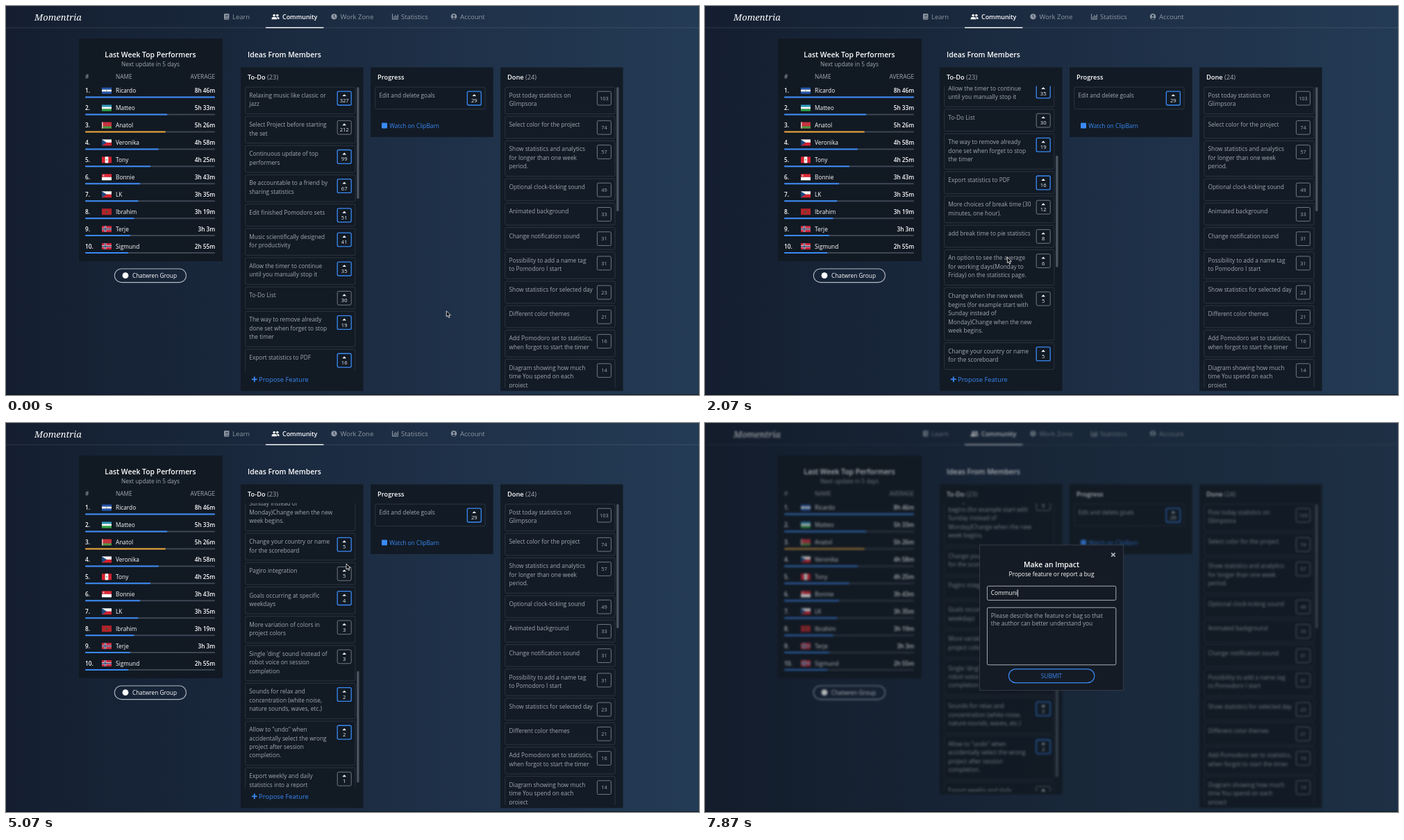
An HTML page for the animation above (8 s loop, 998 by 561 pixels).

```html
<!DOCTYPE html>
<html lang="en">
<head>
<meta charset="utf-8">
<title>Community board</title>
<style>
html, body { margin: 0; width: 100%; height: 100%; overflow: hidden; background: #141e30; }
svg { display: block; width: 100vw; height: 100vh; }
text { font-family: "Open Sans", "Noto Sans", sans-serif; font-size: 8.32px; fill: #fff; white-space: pre; }
.h { font-size: 10.4px; font-weight: 600; }
.h2 { font-size: 9.25px; font-weight: 600; }
.sub { fill: #a3a9b1; }
.nav { font-size: 9.45px; fill: #8f98a4; }
.on { font-size: 8.95px; font-weight: 600; fill: #fff; }
.row { font-weight: 500; }
.time { font-weight: 600; }
.num { font-size: 7.6px; font-weight: 500; fill: #eef0f2; }
.count { font-size: 7.4px; fill: #a3a9b1; }
.blue { fill: #3a8af5; }
.link { font-size: 9.4px; fill: #3a8af5; }
.logo { font-family: "Noto Serif", "Liberation Serif", serif; font-style: italic; font-size: 13px; }
.mid { text-anchor: middle; }
.end { text-anchor: end; }
.panel { fill: #111820; fill-opacity: .86; }
</style>
</head>
<body>
<svg id="stage" viewBox="0 0 998 561" preserveAspectRatio="none"></svg>
<script>
const BLUE = '#3a8af5', GREY = '#8f98a4';
const text = (x, y, s, cls = '') => `<text x="${x}" y="${y}" class="${cls}">${s}</text>`;
const rect = (x, y, w, h, fill, more = '') =>
  `<rect x="${x}" y="${y}" width="${w}" height="${h}" fill="${fill}" ${more}/>`;
const box = (x, y, w, h, stroke, sw, rx) =>
  rect(x, y, w, h, 'none', `stroke="${stroke}" stroke-width="${sw}" rx="${rx}"`);
const path = (d, fill, more = '') => `<path d="${d}" fill="${fill}" ${more}/>`;
const circle = (x, y, r, fill, more = '') => `<circle cx="${x}" cy="${y}" r="${r}" fill="${fill}" ${more}/>`;
const panel = (x, y, w, h, id = '') =>
  `<rect ${id && `id="${id}"`} class="panel" x="${x}" y="${y}" width="${w}" height="${h}"/>`;

// Ideas: votes, "*" when voted by the viewer, lines split by "|"
const parse = list => list.trim().split('\n').map(s => {
  const [, votes, star, body] = s.trim().match(/^(\d+)(\*?) (.*)$/);
  return { votes, voted: !!star, lines: body.split('|') };
});
const todo = parse(`
327* Relaxing music like classic or|jazz
212 Select Project before starting|the set
99* Continuous update of top|performers
67* Be accountable to a friend by|sharing statistics
51* Edit finished Pomodoro sets
41* Music scientifically designed|for productivity
35* Allow the timer to continue|until you manually stop it
30 To-Do List
19* The way to remove already|done set when forget to stop|the timer
16* Export statistics to PDF
12 More choices of break time (30|minutes, one hour).
8 add break time to pie statistics
6 An option to see the average|for working days(Monday to|Friday) on the statistics page.
5 Change when the new week|begins (for example start with|Sunday instead of|Monday)Change when the new|week begins.
5* Change your country or name|for the scoreboard
5 Pagiro integration
5 A possibility to pause and|resume work session
4* Goals occurring at specific|weekdays
3 More variation of colors in|project colors
3 Single 'ding' sound instead of|robot voice on session|completion
2* Sounds for relax and|concentration (white noise,|nature sounds, waves, etc.)
2* Allow to "undo" when|accidentally select the wrong|project after session|completion.
1 Export weekly and daily|statistics into a report`);
const done = parse(`
103 Post today statistics on|Glimpsora
74 Select color for the project
57 Show statistics and analytics|for longer than one week|period.
49 Optional clock-ticking sound
33 Animated background
31 Change notification sound
31 Possibility to add a name tag|to Pomodoro I start
23 Show statistics for selected day
21 Different color themes
16 Add Pomodoro set to statistics,|when forgot to start the timer
14 Diagram showing how much|time You spend on each|project`);

// After the vote the idea climbs above the ones with five votes
const voted = todo.slice();
const [raised] = voted.splice(16, 1);
voted.splice(13, 0, { ...raised, votes: '6', voted: true });

function cards(list, x, arrows = true) {
  let y = 117, out = '';
  for (const { votes, voted, lines } of list) {
    const step = lines.length > 1 ? lines.length * 12.475 + 17.2 : 35.25;
    out += box(x, y, 158.3, step - 3.6, '#36404c', .7, 2);
    lines.forEach((s, i) => out += text(x + 5.7, y + 15 + i * 12.475, s, 'sub'));
    const bx = x + 132.6, cx = bx + 10;
    out += box(bx, y + 6.2, 20, 19.8, voted ? BLUE : '#7c848e', voted ? 1.3 : .9, 2);
    out += arrows
      ? path(`M${cx - 2.8} ${y + 13.1}l2.8-2.9 2.8 2.9z`, '#fff') + text(cx, y + 22.1, votes, 'num mid')
      : text(cx, y + 18.8, votes, 'count mid');
    y += step;
  }
  return out;
}

// Flags, drawn on a 14 by 9 field
const bands = (...c) => c.map((f, i) => rect(0, i * 9 / c.length, 14, 9 / c.length + .05, f)).join('');
const czech = bands('#f4f4f4', '#d3222f') + path('M0 0L7 4.5 0 9z', '#1d4a80');
const norway = rect(0, 0, 14, 9, '#c8283c') + path('M5 0V9M0 4.5H14', 'none', 'stroke="#fff" stroke-width="2.4"') +
  path('M5 0V9M0 4.5H14', 'none', 'stroke="#1c3668" stroke-width="1.2"');
const flags = {
  sv: bands('#2456b0', '#fff', '#2456b0') + circle(7, 4.5, .9, '#8aa67a'),
  uz: bands('#2f9fc4', '#fff', '#2fa548'),
  by: rect(0, 0, 14, 9, '#c8313e') + rect(0, 6, 14, 3, '#4a9a42') + rect(0, 0, 1.6, 9, '#e4b9b9'),
  cz: czech,
  pe: rect(0, 0, 14, 9, '#d2212f') + rect(4.7, 0, 4.6, 9, '#fff') + circle(7, 4.5, 1.1, '#9aa580'),
  sg: bands('#dd2a38', '#fff') + circle(3.2, 2.3, 1.5, '#fff') + circle(3.9, 2.3, 1.3, '#dd2a38'),
  ma: rect(0, 0, 14, 9, '#b3232b') + path('M7 2.8L8.1 6.1 5.3 4.1H8.7L5.9 6.1z', 'none', 'stroke="#27603a" stroke-width=".5"'),
  no: norway
};
const people = [
  ['sv', 'Ricardo', 526], ['uz', 'Matteo', 333], ['by', 'Anatol', 326], ['cz', 'Veronika', 298], ['pe', 'Tony', 265],
  ['sg', 'Bonnie', 223], ['cz', 'LK', 215], ['ma', 'Ibrahim', 199], ['no', 'Terje', 183], ['no', 'Sigmund', 175]
];
function leaderboard() {
  let out = panel(105, 47, 207, 321) +
    text(208, 73.7, 'Last Week Top Performers', 'h mid') +
    text(208, 87.3, 'Next update in 5 days', 'sub mid') +
    text(114, 105, '#', 'sub') + text(158, 105, 'NAME', 'sub') + text(301, 105, 'AVERAGE', 'sub end');
  people.forEach(([flag, name, min], i) => {
    const y = 122 + i * 24.94;
    out += text(114, y + 3.1, `${i + 1}.`, 'time') +
      `<g transform="translate(138 ${y - 4.4})">${flags[flag]}</g>` +
      text(158, y + 3.1, name, 'row') +
      text(301.3, y + 3.1, `${min / 60 | 0}h ${min % 60}m`, 'time end') +
      rect(114, y + 8.6, 187, 2, '#3d4653', 'rx="1"') +
      rect(114, y + 8.6, 187 * min / people[0][2], 2, i == 2 ? '#eda435' : BLUE, 'rx="1"');
  });
  return out + box(156.3, 379, 103.2, 19.6, '#b4bac2', 1.1, 9.8) +
    circle(172, 388.7, 4.4, '#fff') + text(182, 391.8, 'Chatwren Group', 'row');
}

function header() {
  const head = (x, c) => circle(x, 13.6, 1.8, c);
  return rect(0, 30.8, 998, .8, '#fff', 'opacity=".14"') +
    text(41, 20.5, 'Momentria', 'logo') +
    rect(314, 11, 7.4, 8.8, GREY, 'rx="1.2"') + path('M316 13.3H320M316 15H320M315.5 18H321.4', 'none', 'stroke="#18263a" stroke-width=".7"') +
    text(326, 18.8, 'Learn', 'nav') +
    head(386.2, '#fff') + head(390.8, '#fff') +
    path('M382.6 19.2v-1.2a2 2 0 0 1 2-2h3.4a2 2 0 0 1 2 2v1.2zM390.6 18.8h3v-1a1.7 1.7 0 0 0-1.7-1.7h-1.6q.6.9.3 2.7z', '#fff') +
    text(398, 18.8, 'Community', 'nav on') + rect(374, 30.6, 83.4, 1.4, '#fff') +
    circle(472.5, 15.3, 4.1, GREY) + path('M472.5 12.6V15.6L474.4 17', 'none', 'stroke="#1a2a40" stroke-width=".9"') +
    text(481.5, 18.8, 'Work Zone', 'nav') +
    path('M556.5 11.3V18.9H565M558.8 17.5V15M560.7 17.5V13M562.6 17.5V14.4M564.4 17.5V12', 'none', `stroke="${GREY}" stroke-width="1.1"`) +
    text(569, 18.8, 'Statistics', 'nav') +
    circle(645, 15.3, 4.2, GREY) + circle(645, 13.9, 1.5, '#1d2f46') + path('M642.4 17.9q2.6-3 5.2 0-2.6 2-5.2 0z', '#1d2f46') +
    text(654, 18.8, 'Account', 'nav');
}

function board() {
  const title = (x, name, n) => text(x, 106.2, name +
    (n ? ` <tspan font-weight="400" fill="#a3a9b1">(${n})</tspan>` : ''), 'h2');
  return text(348, 73.7, 'Ideas From Members', 'h') +
    panel(338, 88.5, 176.6, 466.7, 'todoPanel') + panel(525, 88.5, 176.6, 100.5) + panel(712, 88.5, 176.6, 466.7) +
    title(348, 'To-Do', 23) + title(535, 'Progress') + title(722, 'Done', 24) +
    `<g clip-path="url(#todoClip)"><g id="list"><g id="before">${cards(todo, 344.6)}</g><g id="after">${cards(voted, 344.6)}</g></g></g>` +
    rect(505.2, 0, 3.3, 161, '#4b5560', 'rx="1.6" id="thumb"') +
    `<g id="propose">${path('M357.8 534.5V542.3M353.9 538.4H361.7', 'none', `stroke="${BLUE}" stroke-width="1.8"`)}` +
    text(364, 541.8, 'Propose Feature', 'link') + '</g>' +
    cards(parse('29* Edit and delete goals'), 531.7) +
    rect(541, 168.6, 8, 8, BLUE, 'rx="1"') + text(552.3, 175.6, 'Watch on ClipBarn', 'blue row') +
    `<g clip-path="url(#doneClip)">${cards(done, 718.8, false)}</g>` +
    rect(879.2, 117, 3.3, 179, '#4b5560', 'rx="1.6"');
}

const modal = () =>
  rect(395.5, 176, 207, 209.5, '#141b25', 'stroke="#3a434f" stroke-width=".8"') +
  path('M585.2 187.3L590.6 192.7M590.6 187.3L585.2 192.7', 'none', 'stroke="#adb3ba" stroke-width="1.7"') +
  text(499, 207.7, 'Make an Impact', 'h mid') +
  text(499, 221.2, 'Propose feature or report a bug', 'mid') +
  box(406.4, 235.2, 185.4, 20.4, '#b9bec4', .9, 2) +
  '<text id="typed" x="411.8" y="248.1"></text>' + rect(0, 240.2, .8, 10, '#fff', 'id="caret"') +
  box(406.4, 266.2, 185.4, 82.6, '#b9bec4', .9, 2) +
  text(411.8, 280.6, 'Please describe the feature or bag so that', 'sub') +
  text(411.8, 292.1, 'the author can better understand you', 'sub') +
  box(437.4, 354.9, 123.5, 19.7, BLUE, 1.2, 9.8) + text(499, 367.8, 'SUBMIT', 'blue mid');

document.getElementById('stage').innerHTML = `<defs>
  <linearGradient id="sky"><stop offset="0" stop-color="#141e30"/><stop offset="1" stop-color="#243b55"/></linearGradient>
  <clipPath id="todoClip">${rect(340, 115.5, 165, 410.5, '#000', 'id="listArea"')}</clipPath>
  <clipPath id="doneClip">${rect(714, 115.5, 165, 435, '#000')}</clipPath></defs>` +
  rect(0, 0, 998, 561, 'url(#sky)') +
  `<g id="page">${header()}${leaderboard()}${board()}</g>` +
  rect(0, 0, 998, 561, '#141c27', 'id="shade"') + `<g id="modal">${modal()}</g>` +
  rect(0, 560.2, 998, .8, '#0b1118') +
  `<g id="cursor">${path('M0 0V8.2L1.9 6.5 3.3 9.6 4.7 9 3.4 6H6z', '#000', 'stroke="#fff" stroke-width=".8"')}</g>`;

const el = {};
for (const id of ['page', 'shade', 'modal', 'list', 'listArea', 'before', 'after', 'thumb', 'todoPanel', 'propose', 'typed', 'caret', 'cursor'])
  el[id] = document.getElementById(id);

const clamp = p => Math.max(0, Math.min(1, p));
const smooth = p => p * p * (3 - 2 * p);
const glide = p => smooth(1 - (1 - p) ** 1.5);

// Keys are [time, ...values]; values ease from one key to the next
function track(keys, t, ease) {
  let i = 0;
  while (i < keys.length - 2 && t >= keys[i + 1][0]) i++;
  const [a, b] = [keys[i], keys[i + 1]];
  const p = ease(clamp((t - a[0]) / (b[0] - a[0])));
  return a.slice(1).map((v, k) => v + (b[k + 1] - v) * p);
}
const END = 641.4;
const scrollKeys = [[450, 0], [870, 36], [1040, 36], [1070, 39], [1870, 252], [2050, 252], [2070, 256.2],
  [2730, 490], [2850, 490], [2870, 496.4], [3200, END], [4800, END], [5600, 604.2]];
const cursorKeys = [[60, 634.3, 439.8], [330, 435.3, 362.3], [3500, 435.3, 362.3], [3730, 436, 366],
  [4040, 436, 366], [4070, 436.5, 367], [4300, 436.5, 367], [4470, 490, 203], [5640, 490, 203],
  [5930, 461.7, 299.7], [6000, 460, 306], [6470, 395, 536]];
const keyTimes = [7070, 7200, 7290, 7400, 7530, 7730, 7870];
const word = 'Communi', DURATION = 8000;
const show = (node, on) => node.setAttribute('display', on ? 'inline' : 'none');

function draw(t) {
  const [scroll] = track(scrollKeys, t, glide);
  el.list.setAttribute('transform', `translate(0 ${-scroll})`);
  el.thumb.setAttribute('y', 117 + scroll * 247 / END);
  show(el.before, t < 4800);
  show(el.after, t >= 4800);

  const open = smooth(clamp((t - 6640) / 240));
  show(el.propose, !open);
  el.todoPanel.setAttribute('height', open ? 447 : 466.7);
  el.listArea.setAttribute('height', open ? 416 : 410.5);
  el.page.style.filter = open ? `blur(${1.75 * open}px)` : 'none';
  el.shade.setAttribute('opacity', .33 * open);
  el.modal.setAttribute('opacity', open);
  show(el.modal, open > 0);

  const typed = word.slice(0, keyTimes.filter(k => t >= k).length + (t >= keyTimes[6]));
  if (el.typed.textContent !== typed) el.typed.textContent = typed;
  el.caret.setAttribute('x', 412 + (open && typed ? el.typed.getComputedTextLength() : 0));

  const [x, y] = track(cursorKeys, t, smooth);
  el.cursor.setAttribute('transform', `translate(${x} ${y})`);
  show(el.cursor, t < keyTimes[0]);
}

const start = performance.now();
function tick() {
  draw((performance.now() - start) % DURATION);
  requestAnimationFrame(tick);
}
draw(0);
requestAnimationFrame(tick);
</script>
</body>
</html>
```
